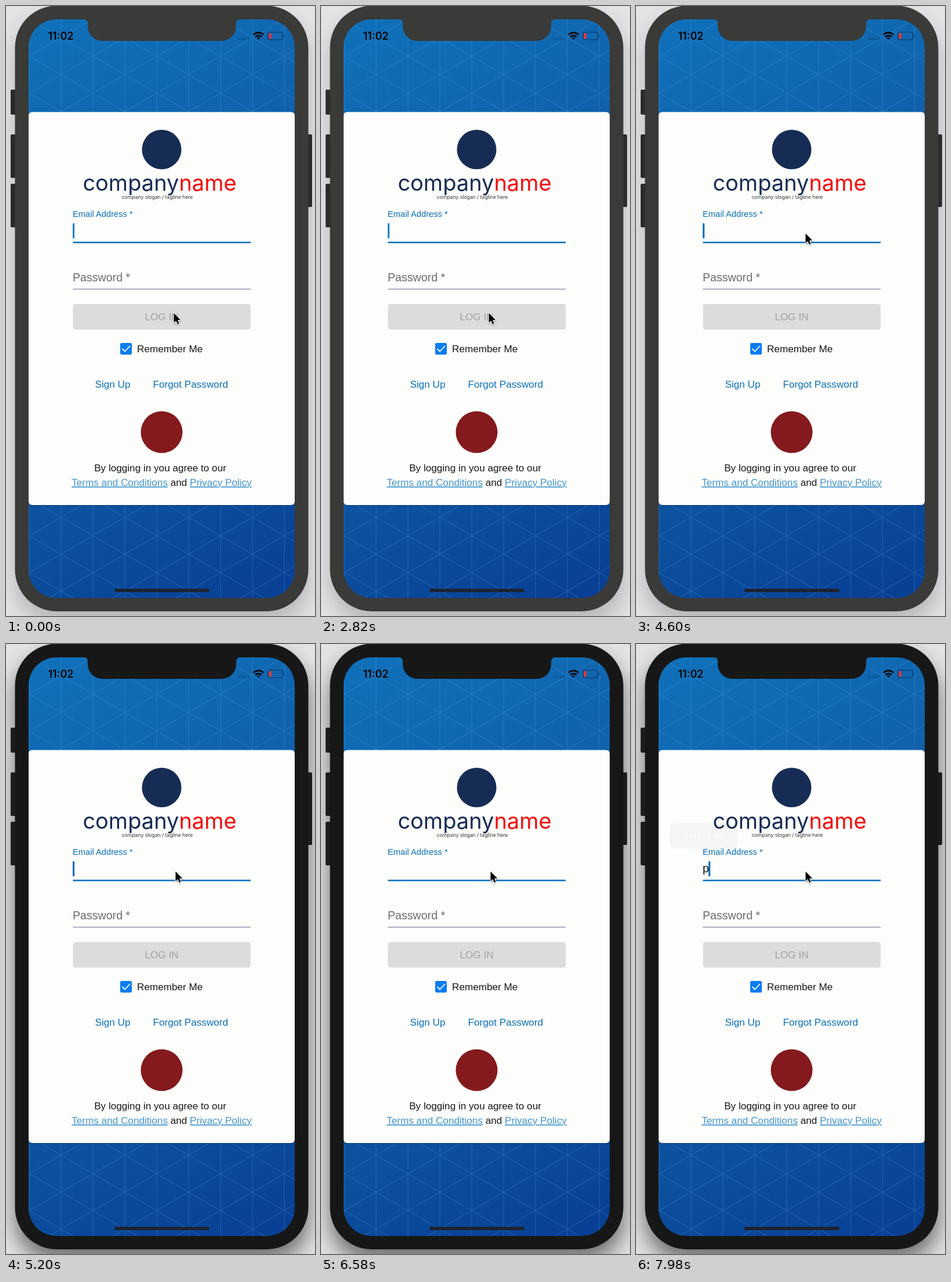
Recreate the animation shown at these times as an HTML page. Size 533 px wide and 1050 px high, loop 8000 ms.

```html
<!DOCTYPE html>
<html lang="en">
<head>
<meta charset="utf-8">
<title>Login screen</title>
<style>
  html, body { margin: 0; width: 100%; height: 100%; overflow: hidden; background: #e2e3e4; }
  svg { display: block; width: 533px; height: 1050px; }
  text { font-family: "Liberation Sans", Arial, sans-serif; font-size: 17.15px; fill: #161616; }
  .ui { font-family: Inter, sans-serif; }
  .mid { text-anchor: middle; }
  .blue { fill: #0a70b8; }
  .link { fill: #4295cd; text-decoration: underline; }
</style>
</head>
<body>
<svg viewBox="0 0 533 1050">
  <defs>
    <linearGradient id="sky" gradientUnits="userSpaceOnUse" x1="39" y1="60" x2="498" y2="1000">
      <stop offset="0" stop-color="#0f70b9"/>
      <stop offset=".3" stop-color="#1160aa"/>
      <stop offset=".75" stop-color="#0c509e"/>
      <stop offset="1" stop-color="#083f95"/>
    </linearGradient>
    <clipPath id="screen"><rect x="39" y="23" width="459" height="996" rx="48"/></clipPath>
    <filter id="blur" x="-20%" y="-10%" width="140%" height="120%"><feGaussianBlur stdDeviation="18"/></filter>
    <filter id="soft" x="-50%" y="-50%" width="200%" height="200%">
      <feDropShadow dx="0" dy="1.5" stdDeviation="1" flood-opacity=".35"/>
    </filter>
  </defs>

  <!-- phone body -->
  <rect id="shade" x="16" y="22" width="506" height="1040" rx="70" filter="url(#blur)"/>
  <path id="keys" d="M8 146q0-2 2-2h8v43h-8q-2 0-2-2zM8 223q0-2 2-2h8v75h-8q-2 0-2-2zM8 308q0-2 2-2h8v75h-8q-2 0-2-2zM519 221h7q2 0 2 2v121q0 2-2 2h-7z"/>
  <rect id="body" x="15.5" y="-.5" width="506" height="1042.500" rx="72"/>

  <!-- screen -->
  <g clip-path="url(#screen)">
    <rect x="39" y="23" width="459" height="996" fill="url(#sky)"/>
    <path id="grid" fill="none" stroke="#5aa0d8" stroke-opacity=".16" stroke-width="2"/>
    <rect x="39" y="184" width="459" height="676.500" rx="6" fill="#04264f" opacity=".4"/>
    <rect x="39" y="182.500" width="459" height="676.500" rx="6" fill="#fdfdfc"/>
  </g>
  <path id="notch" d="M133 22.5q8 0 8 8v4.500a25 25 0 0 0 25 25h206a25 25 0 0 0 25-25v-4.500q0-8 8-8z"/>

  <!-- status bar -->
  <text class="ui" x="72.500" y="58" style="font-size:18px;font-weight:600;fill:#000">11:02</text>
  <g fill="#0a3c70" opacity=".6">
    <circle cx="402" cy="56.500" r="1.700"/><circle cx="407.500" cy="56.500" r="1.700"/>
    <circle cx="413" cy="56.500" r="1.700"/><circle cx="418.500" cy="56.500" r="1.700"/>
  </g>
  <g fill="none" stroke="#000" stroke-width="2.800">
    <path d="M427 49.500a12 12 0 0 1 17 0M430.200 53a7.500 7.500 0 0 1 10.600 0"/>
    <path d="M435.500 58l-2.700-2.800a4 4 0 0 1 5.400 0z" fill="#000" stroke="none"/>
  </g>
  <rect x="452" y="45" width="25.500" height="13" rx="3.500" fill="none" stroke="#08294c" stroke-opacity=".8" stroke-width="1.200"/>
  <path d="M479.300 49.500q2 2 0 4.500z" fill="#08294c"/>
  <rect x="453.500" y="46.500" width="4" height="10" rx="1.500" fill="#fb3030"/>

  <!-- brand area -->
  <circle cx="268.500" cy="247" r="34" fill="#172c55"/>
  <text class="ui mid" x="265" y="318" style="font-size:38px;fill:#172c55">company<tspan fill="#f30d0d">name</tspan></text>
  <text class="ui mid" x="261" y="332" style="font-size:8.600px;fill:#333">company slogan / tagline here</text>

  <!-- form -->
  <text class="blue" x="115" y="363" style="font-size:14.700px">Email Address *</text>
  <text id="typed" x="115" y="393" style="font-size:19.600px"></text>
  <rect x="115.500" y="405.700" width="306.500" height="2.600" fill="#0b72bd"/>
  <rect id="caret" y="374" width="3.200" height="26" rx="1" fill="#0b70bb"/>
  <text x="115" y="474" style="font-size:19.600px;fill:#6c6c6c">Password *</text>
  <rect x="115.500" y="486.700" width="306.500" height="1.400" fill="#8b8dae"/>
  <rect x="115.500" y="513" width="306.500" height="44" rx="4.500" fill="#dcdcdc"/>
  <text class="mid" x="268.500" y="541" style="fill:#a2a2a2">LOG IN</text>
  <rect x="197" y="580" width="20" height="20" rx="2.500" fill="#087cf1"/>
  <path d="M200.500 590l4.500 4.500 9-9.500" fill="none" stroke="#fff" stroke-width="1.800"/>
  <text x="226" y="596">Remember Me</text>
  <text class="blue" x="153.500" y="657">Sign Up</text>
  <text class="blue" x="253.500" y="657">Forgot Password</text>
  <circle cx="268.500" cy="733.500" r="36" fill="#841a1d"/>
  <text class="mid" x="266" y="801">By logging in you agree to our</text>
  <text class="mid" x="268.500" y="826"><tspan class="link">Terms and Conditions</tspan> and <tspan class="link">Privacy Policy</tspan></text>
  <rect x="187" y="1003" width="164" height="6" rx="3" fill="#1b2430"/>

  <g id="menu">
    <path d="M66 308h101q8 0 8 8v28q0 8-8 8h-39l-11 10.500-11-10.500h-40q-8 0-8-8v-28q0-8 8-8z" fill="#1a1a1a"/>
    <text class="ui mid" x="116.500" y="336" style="font-size:16.500px;fill:#fff">Select All</text>
  </g>
  <g id="mouse"><path d="M0 0V17.500L4 13.700 6.700 20 9.500 18.800 6.900 12.600H12.300Z" transform="scale(.960)"
    stroke="#fff" stroke-width="2.200" paint-order="stroke" stroke-linejoin="round" filter="url(#soft)"/></g>
</svg>
<script>
const $ = id => document.getElementById(id);
const set = (id, attrs) => { for (const k in attrs) $(id).setAttribute(k, attrs[k]); };
const ramp = (t, a, b) => Math.min(1, Math.max(0, (t - a) / (b - a)));
const ease = x => x * x * (3 - 2 * x);

const LOOP = 8000, FOCUS = 5120, TAP = 6600, TYPE = 7760;

// Isometric line pattern: verticals plus two families of diagonals
let lines = '';
for (let x = 40; x < 500; x += 55) lines += `M${x} 23V1019`;
for (let y = -200; y < 1300; y += 63.5) {
  lines += `M40 ${y + 32.25}l460 265.6M40 ${y + 32.25}l460-265.6`;
}
set('grid', { d: lines });

// The caret blink restarts with each click or key press
function blink(t) {
  const start = t >= TYPE ? TYPE : t >= TAP ? TAP : t >= FOCUS ? FOCUS : -325;
  const s = (t - start) % 940;
  return s < 800 ? 1 - ramp(s, 300, 500) : ramp(s, 800, 950);
}

function draw(t) {
  const focused = t >= FOCUS, typed = t >= TYPE;
  const shell = focused ? '#171717' : '#3a3a39';
  set('body', { fill: shell });
  set('notch', { fill: shell });
  set('keys', { fill: focused ? '#1c1c1c' : '#2b2b2b' });
  set('shade', { opacity: focused ? .52 : .2 });
  $('typed').textContent = typed ? 'p' : '';
  set('caret', { x: typed ? 125 : 115, opacity: blink(t) });
  set('menu', { opacity: ramp(t, TAP + 100, TAP + 250) * (1 - ramp(t, TYPE, TYPE + 228)) });
  const k = ease(ramp(t, 3500, 4200));
  set('mouse', { transform: `translate(${289.5 + 3 * k} ${528.5 - 137 * k})` });
}

const origin = performance.now();
function tick() {
  draw((performance.now() - origin) % LOOP);
  requestAnimationFrame(tick);
}
tick();
</script>
</body>
</html>
```
